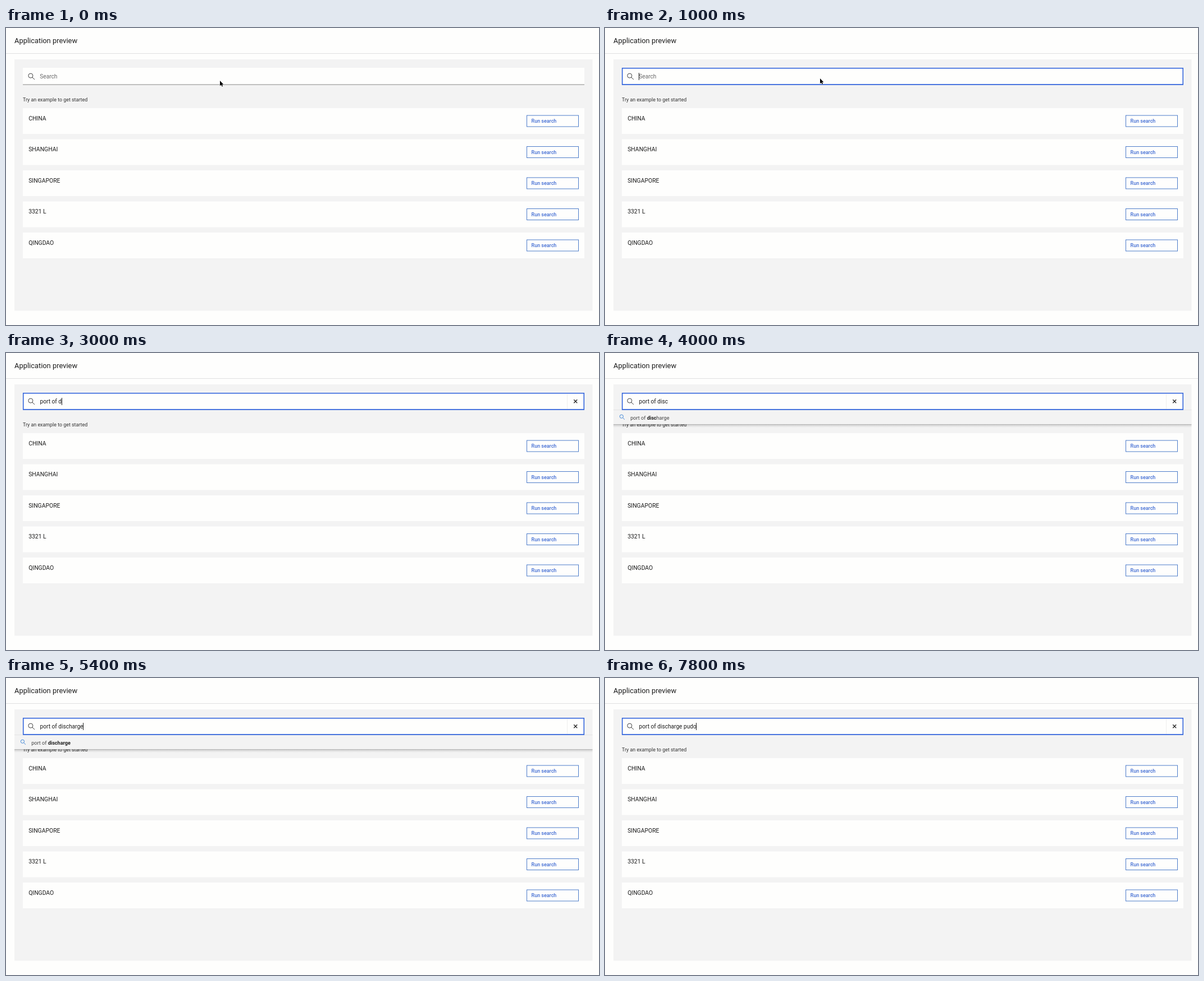
These frames come from a looping animation (1056x530 px, 8000 ms). An HTML page:

```html
<!DOCTYPE html>
<html lang="en">
<head>
<meta charset="utf-8">
<title>Application preview</title>
<style>
  html, body { margin: 0; width: 100%; height: 100%; overflow: hidden; background: #fefefd; }
  svg { display: block; width: 1056px; height: 530px; font-family: Roboto, "Noto Sans", sans-serif; fill: #1c1c1c; }
  text { white-space: pre; }
  .line { fill: none; stroke-width: 1; }
  .action { font-size: 8.95px; font-weight: 500; fill: #3f6bd3; }
</style>
</head>
<body>
<svg viewBox="0 0 1056 530">
  <defs>
    <linearGradient id="shade" x2="0" y2="1">
      <stop offset="0" stop-color="#000" stop-opacity=".28"/>
      <stop offset=".35" stop-color="#000" stop-opacity=".1"/>
      <stop offset="1" stop-color="#000" stop-opacity="0"/>
    </linearGradient>
  </defs>
  <rect width="1056" height="530" fill="#fefefd"/>
  <text x="15" y="26.6" font-size="12.9">Application preview</text>
  <path class="line" d="M0 45.5H1056" stroke="#e0e0e0"/>
  <rect x="15" y="56" width="1029.5" height="448.5" fill="#f3f3f3"/>
  <text x="30" y="130.7" font-size="8.9" fill="#333">Try an example to get started</text>
  <g id="cards"></g>

  <g id="suggestion">
    <rect x="15" y="127" width="1029.5" height="6" fill="url(#shade)"/>
    <rect x="15" y="101" width="1029.5" height="26" fill="#f3f3f3"/>
    <path class="line" d="M15 101.5H1044.5" stroke="#e4e4e4"/>
    <g class="line" stroke="#4589d8"><circle cx="29.4" cy="113.2" r="3.1"/><path d="M31.7 115.5L35 118.8"/></g>
    <text x="45.2" y="118.6" font-size="9.1" fill="#444">port of <tspan id="matched" font-weight="700" fill="#222"></tspan><tspan id="rest"></tspan></text>
  </g>

  <rect x="30" y="71" width="1000" height="30" fill="#fefefd"/>
  <path id="underline" class="line" d="M30 101H1030" stroke="#868686"/>
  <rect id="ring" class="line" x="30.75" y="71.75" width="998.5" height="29" style="stroke-width:1.6"/>
  <g class="line" stroke="#444"><circle cx="43.9" cy="85.1" r="4"/><path d="M46.8 88L51 92"/></g>
  <text id="placeholder" x="60.2" y="90.3" font-size="10.2" fill="#6b6b6b">Search</text>
  <text id="query" x="60.5" y="90.3" font-size="10.13"></text>
  <rect id="caret" y="80" width="1" height="13" fill="#222"/>
  <g id="clear" class="line">
    <path d="M999.5 73V100" stroke="#eeeeed"/>
    <path d="M1011.2 83.3l6 6m0 -6l-6 6" stroke="#222" style="stroke-width:1.3"/>
  </g>
  <path id="pointer" d="M0 0V9.2L2.1 7.3L3.7 10.6L5.1 9.9L3.6 6.8H6.4Z" fill="#000" stroke="#fff" stroke-width=".7" paint-order="stroke"/>
</svg>
<script>
const DURATION = 8000;
const byId = id => document.getElementById(id);
const [suggestion, matched, rest, underline, ring, placeholder, query, caret, clearButton, pointer] =
  ["suggestion", "matched", "rest", "underline", "ring", "placeholder", "query", "caret", "clear", "pointer"].map(byId);

byId("cards").innerHTML = ["CHINA", "SHANGHAI", "SINGAPORE", "3321 L", "QINGDAO"].map((label, i) => `
  <g transform="translate(0 ${143 + 55.5 * i})">
    <rect x="30" width="1000" height="46" fill="#fefefd"/>
    <text x="40.2" y="21.9" font-size="10.4">${label}</text>
    <rect class="line" x="927.5" y="13" width="92" height="20" stroke="#4d7cc9"/>
    <text class="action" x="935.6" y="26.3">Run search</text>
  </g>`).join("");

const PHRASE = "port of discharge pudo";
const PREFIX = "port of ".length;
const WORD = "discharge";

// Each entry is [start time, value]; the value holds until the next entry.
const TYPED = [[0, 0], [1600, 1], [1800, 2], [2000, 3], [2200, 4], [2400, 5], [2800, 7], [3000, 9],
  [3200, 10], [3400, 12], [4800, 13], [5000, 14], [5200, 15], [5400, 17], [5600, 18], [6000, 19],
  [6200, 20], [7200, 21], [7800, 22]];
const POINTER = [[0, [381, 94]], [400, [382, 92]], [600, [383, 90]], [1200, [420, 321]], [1400, null]];
const CARET = [[0, 0], [800, 1], [3800, 0], [4200, 1], [6600, 0], [7200, 1], [7600, 0], [7800, 1]];
const FOCUS = [[0, ["none", "#868686"]], [800, ["#a9bff5", "#6386cf"]], [1000, ["#3566dc", "#3566dc"]]];

const at = (track, t) => track.findLast(([start]) => start <= t)[1];
const show = (node, visible) => node.setAttribute("visibility", visible ? "visible" : "hidden");

function render(t) {
  const count = at(TYPED, t);
  query.textContent = PHRASE.slice(0, count);
  show(placeholder, !count);
  show(clearButton, count);

  const textWidth = count ? query.getComputedTextLength() : 0;
  caret.setAttribute("x", Math.round(60.1 + textWidth));
  show(caret, at(CARET, t));

  const [ringColor, lineColor] = at(FOCUS, t);
  ring.setAttribute("stroke", ringColor);
  underline.setAttribute("stroke", lineColor);

  const split = Math.max(0, count - PREFIX);
  matched.textContent = WORD.slice(0, split);
  rest.textContent = WORD.slice(split);
  show(suggestion, t >= 4000 && t < 5600);

  const tip = at(POINTER, t);
  show(pointer, tip);
  if (tip) pointer.setAttribute("transform", `translate(${tip})`);
}

const origin = performance.now();
function tick() {
  render((performance.now() - origin) % DURATION);
  requestAnimationFrame(tick);
}
tick();
</script>
</body>
</html>
```
